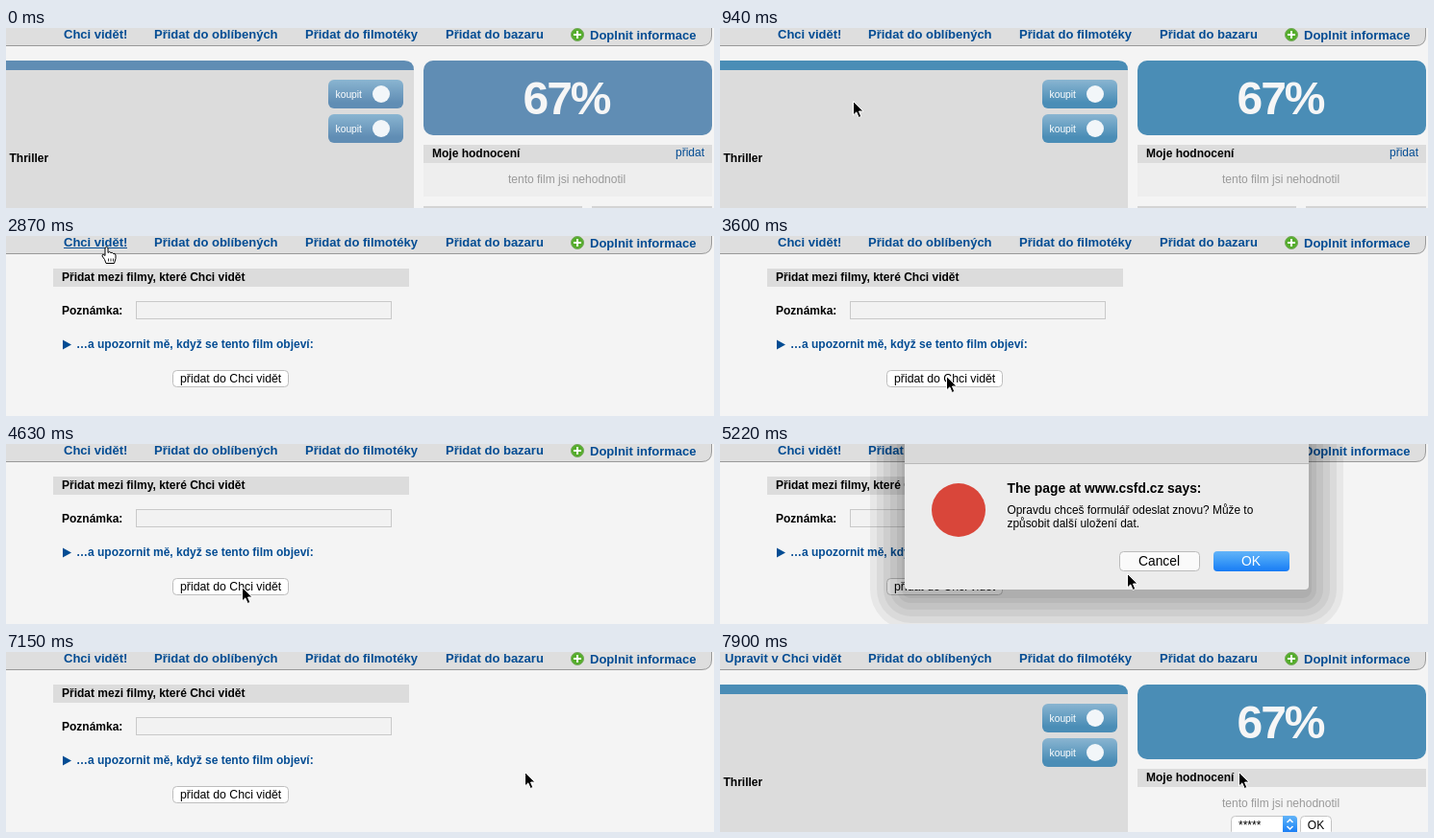
An HTML page that plays this animation: 736 by 188 pixels, repeating every 8000 ms.

```html
<!DOCTYPE html>
<html lang="cs">
<head>
<meta charset="utf-8">
<style>
  html, body { margin: 0; width: 736px; height: 188px; overflow: hidden; background: #f4f4f4; }
  svg { display: block; font: 12px "Liberation Sans", Arial, sans-serif; }
  .bold { font-weight: bold; }
  .nav { font: bold 13px "Liberation Sans", Arial, sans-serif; fill: #034c93; }
  .link { fill: #034c93; }
  .mid { text-anchor: middle; }
  .accent { fill: var(--accent); }
  .score { font-size: 48px; letter-spacing: -2px; fill: #f6f6f6; }
</style>
</head>
<body>
<svg id="stage" width="736" height="188" viewBox="0 0 736 188">
  <defs>
    <linearGradient id="buy" x2="0" y2="1">
      <stop offset="0" stop-color="#8ab5d1"/><stop offset=".8" style="stop-color: var(--accent)"/>
    </linearGradient>
    <linearGradient id="blue" x2="0" y2="1">
      <stop offset="0" stop-color="#63b4f8"/><stop offset=".5" stop-color="#3b9af7"/><stop offset="1" stop-color="#177bf5"/>
    </linearGradient>
  </defs>

  <rect width="736" height="188" fill="#f4f4f4"/>
  <path d="M-2-2H733.5V8q0 10.500-10.500 10.500H-2z" fill="#dedede" stroke="#999"/>
  <g class="nav">
    <text id="want" y="11"></text>
    <text x="154" y="11">Přidat do oblíbených</text>
    <text x="311" y="11">Přidat do filmotéky</text>
    <text x="457" y="11">Přidat do bazaru</text>
    <text x="607" y="12">Doplnit informace</text>
  </g>
  <rect id="underline" x="60" y="12" width="66" height="1" fill="#034c93"/>
  <circle cx="594" cy="7" r="6.500" fill="#55ad2b" stroke="#74a75c"/>
  <path d="M594 3v8M590 7h8" stroke="#fff" stroke-width="2"/>

  <g id="film">
    <path d="M0 44H424V188H0z" fill="#dcdcdc"/>
    <path class="accent" d="M0 34H414q10 0 10 10H0z"/>
    <g id="shops"></g>
    <text class="bold" x="3.500" y="140">Thriller</text>
    <rect class="accent" x="434" y="34" width="300" height="78" rx="10"/>
    <text class="bold mid score" x="582.500" y="90">67%</text>
    <g id="unrated">
      <rect x="434" y="140" width="300" height="36" fill="#eee"/>
      <path d="M434 186h165v2H434zM609 186h125v2H609z" fill="#d4d4d4"/>
    </g>
    <rect x="434" y="122" width="300" height="19" fill="#dcdcdc"/>
    <text class="bold" x="443" y="135">Moje hodnocení</text>
    <text id="add" class="link" x="696" y="134">přidat</text>
    <text x="522" y="162" fill="#999">tento film jsi nehodnotil</text>
    <g id="rating">
      <rect x="531.500" y="171.500" width="68" height="20" rx="4" fill="#fff" stroke="#c4c4c4"/>
      <path d="M585 171h11q4 0 4 4v14h-15z" fill="url(#blue)"/>
      <path d="M589.500 178l3-3 3 3M589.500 182l3 3 3-3" fill="none" stroke="#fff" stroke-width="1.500"/>
      <text x="539" y="185">*****</text>
      <rect x="603.500" y="171.500" width="32" height="20" rx="4" fill="#fff" stroke="#c4c4c4"/>
      <text class="mid" x="619.500" y="185">OK</text>
    </g>
  </g>

  <g id="form">
    <rect x="49" y="34" width="370" height="19" fill="#dcdcdc"/>
    <g class="bold">
      <text x="58" y="47">Přidat mezi filmy, které Chci vidět</text>
      <text x="58" y="82">Poznámka:</text>
      <text class="link" x="73" y="117">…a upozornit mě, když se tento film objeví:</text>
    </g>
    <rect x="135.500" y="68.500" width="265" height="18" fill="#f2f2f2" stroke="#c9c9c9"/>
    <path class="link" d="M59 108.500l9 5-9 5z"/>
    <rect id="submit" x="173.500" y="140.500" width="120" height="17" rx="4" stroke="#bdbdbd"/>
    <text id="submitText" x="181" y="153" font-size="12.300">přidat do Chci vidět</text>
  </g>

  <g id="dialog">
    <g id="shadow"></g>
    <rect x="192" y="-10" width="420" height="162" rx="4" fill="#ececec"/>
    <path d="M192 0H612V20H192z" fill="#d9d9d9"/>
    <path d="M192 20.500H612" stroke="#b9b9b9"/>
    <circle cx="248" cy="69" r="28" fill="#d9463a"/>
    <text class="bold" x="298.500" y="51" font-size="13.800">The page at www.csfd.cz says:</text>
    <g font-size="11.900">
      <text x="298.500" y="73">Opravdu chceš formulář odeslat znovu? Může to</text>
      <text x="298.500" y="87">způsobit další uložení dat.</text>
    </g>
    <g class="mid" font-size="13.800">
      <rect x="415.500" y="112.500" width="83" height="20" rx="4" fill="#fafafa" stroke="#bbb"/>
      <text x="456.500" y="127">Cancel</text>
      <rect x="513" y="112" width="79" height="21" rx="4" fill="url(#blue)"/>
      <text x="552" y="127" fill="#fff">OK</text>
    </g>
  </g>

  <g id="cursor" stroke-linejoin="round">
    <path id="arrow" d="M0 0V14.500L3.300 11.400 5.700 17 8.300 15.900 6 10.500H10.600z" fill="#000" stroke="#fff"/>
    <g id="hand" fill="#fff" stroke="#000">
      <path d="M-1.500 9V1Q0-1 1.500 1V6Q3 4 4.500 6Q6 5 7 7Q9 6 9.500 8.500V12L8 17H-.500L-2 13-4.500 9.500Q-4.500 7-2.800 8z"/>
      <path d="M2 12v3M4.500 12v3M7 12v3" stroke-width=".8"/>
    </g>
  </g>
</svg>
<script>
const LOOP = 8000;
const $ = id => document.getElementById(id);
const show = (id, on) => { $(id).style.display = on ? '' : 'none'; };
const within = (t, a, b) => t >= a && t < b;

$('shops').innerHTML = [54, 90].map(y => `
  <rect x="335" y="${y}" width="78" height="30" rx="6" fill="url(#buy)"/>
  <text x="342.500" y="${y + 18.500}" font-size="10.300" fill="#fff">koupit</text>
  <circle cx="390" cy="${y + 15}" r="9" fill="#f2f6f9"/>`).join('');

// Nested translucent bands make the stepped shadow.
$('shadow').innerHTML = [36, 29, 22, 15, 8, 3].map(d =>
  `<rect x="${192 - d}" y="-60" width="${420 + 2 * d}" height="${218 + d}" rx="${d + 6}" opacity=".055"/>`).join('');

// Each move: first step, last step, number of steps, end point.
const START = [215, 186];
const MOVES = [
  [500, 1380, 7, 88, 5],
  [1680, 1970, 3, 104, 11],
  [2570, 2570, 1, 103, 9],
  [2870, 2870, 1, 104, 11],
  [3010, 3600, 5, 235, 146],
  [3900, 4050, 2, 250, 148],
  [4190, 4190, 1, 245, 149],
  [4780, 5660, 7, 539, 126],
  [6260, 6260, 1, 539, 125]
];

function cursorAt(t) {
  let [x, y] = START;
  for (const [first, last, steps, toX, toY] of MOVES) {
    if (t < first) break;
    const gap = steps > 1 ? (last - first) / (steps - 1) : 1;
    const p = Math.min(1, (Math.floor((t - first) / gap + 1e-6) + 1) / steps);
    const eased = p * p * (3 - 2 * p);
    x += (toX - x) * eased;
    y += (toY - y) * eased;
  }
  return [x, y];
}

function render(t) {
  const saved = t >= 7900;
  const form = within(t, 2870, 7900);
  show('film', !form);
  show('form', form);
  show('dialog', within(t, 4780, 6260));
  show('rating', saved);
  show('unrated', !saved);
  show('add', !saved);

  $('want').textContent = saved ? 'Upravit v Chci vidět' : 'Chci vidět!';
  $('want').setAttribute('x', saved ? 5 : 60);
  show('underline', within(t, 1380, 3010));
  $('stage').style.setProperty('--accent', t < 500 ? '#608db4' : '#4a8db6');

  const pressed = within(t, 4490, 4630);
  $('submit').setAttribute('fill', pressed ? 'url(#blue)' : '#fff');
  $('submitText').setAttribute('fill', pressed ? '#fff' : '#000');

  const hand = within(t, 1380, 2570) || within(t, 2870, 3010);
  const [x, y] = cursorAt(t).map(Math.round);
  show('cursor', t >= 500);
  show('hand', hand);
  show('arrow', !hand);
  $('cursor').setAttribute('transform', `translate(${x + 0.5} ${y + 0.5})`);
}

function tick() {
  render(performance.now() % LOOP);
  requestAnimationFrame(tick);
}
tick();
</script>
</body>
</html>
```
